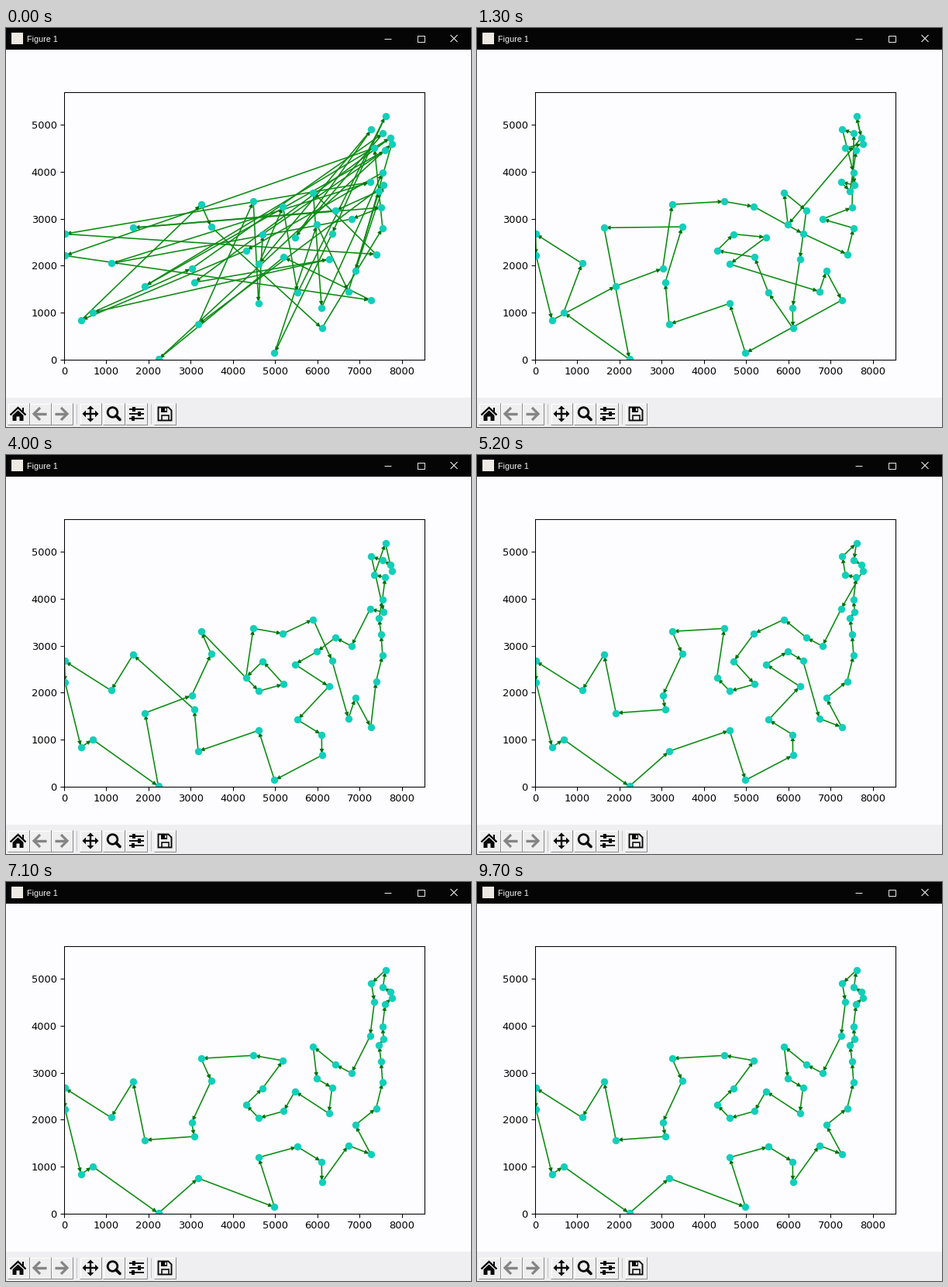
Animation of 600x516 px, one loop 9800 ms. Source, as a matplotlib script:

```python
import itertools

import matplotlib.pyplot as plt
import numpy as np
from matplotlib.animation import FuncAnimation
from matplotlib.collections import LineCollection, PolyCollection
from matplotlib.patches import Circle, Polygon, Rectangle

W, H, DPI = 600, 516, 100
FRAMES, STEP_MS = 98, 100
PX = 72 / DPI  # one pixel in points

LEFT, BOTTOM, PLOT_W, PLOT_H = 75, 429, 465, 346.5
EDGE, HEAD, DOT, INK, GRAY = "#0a8c12", "#00700a", "#12cfb9", "#0a0a0a", "#858585"

# The att48 cities
X = [6734, 2233, 5530, 401, 3082, 7608, 7573, 7265, 6898, 1112, 5468, 5989,
     4706, 4612, 6347, 6107, 7611, 7462, 7732, 5900, 4483, 6101, 5199, 1633,
     4307, 675, 7555, 7541, 3177, 7352, 7545, 3245, 6426, 4608, 23, 7248,
     7762, 7392, 3484, 6271, 4985, 1916, 7280, 7509, 10, 6807, 5185, 3023]
Y = [1453, 10, 1424, 841, 1644, 4458, 3716, 1268, 1885, 2049, 2606, 2873,
     2674, 2035, 2683, 669, 5184, 3590, 4723, 3561, 3369, 1110, 2182, 2809,
     2322, 1006, 4819, 3981, 756, 4506, 2801, 3305, 3173, 1198, 2216, 3779,
     4595, 2244, 2829, 2135, 140, 1569, 4899, 3239, 2676, 2993, 3258, 1942]
X_MAX, Y_MAX = 1.1 * max(X), 1.1 * max(Y)
CITIES = np.column_stack([LEFT + np.array(X) * PLOT_W / X_MAX,
                          BOTTOM - np.array(Y) * PLOT_H / Y_MAX])
DIST = np.hypot(*(CITIES[:, None] - CITIES[None]).transpose(2, 0, 1)).tolist()
N = len(X)

# Tours by city number, starting at 1
SHUFFLED = [30, 35, 8, 23, 2, 37, 9, 7, 29, 21, 34, 13, 6, 42, 19, 5,
            40, 26, 48, 27, 11, 43, 14, 47, 3, 17, 15, 41, 12, 1, 18, 33,
            24, 44, 46, 10, 36, 45, 38, 20, 22, 28, 25, 4, 32, 39, 16, 31]
ROUGH = [45, 35, 4, 42, 48, 32, 21, 47, 15, 38, 31, 46, 44, 27, 43, 28,
         7, 36, 18, 6, 30, 37, 17, 19, 12, 20, 33, 40, 22, 16, 3, 23,
         25, 13, 11, 14, 1, 9, 8, 41, 34, 29, 5, 39, 24, 2, 26, 10]
BETTER = [45, 35, 4, 2, 42, 48, 32, 21, 47, 13, 14, 25, 11, 23, 15, 38,
          31, 46, 44, 18, 28, 27, 6, 30, 43, 17, 19, 37, 7, 36, 12, 20,
          33, 40, 3, 22, 16, 1, 9, 8, 41, 34, 29, 5, 39, 24, 10, 26]
GOOD = [45, 35, 4, 26, 2, 42, 48, 39, 32, 14, 23, 13, 25, 21, 47, 20,
        15, 1, 9, 8, 38, 31, 44, 18, 28, 6, 30, 17, 37, 19, 27, 43,
        7, 36, 46, 33, 12, 11, 40, 3, 22, 16, 41, 34, 29, 5, 24, 10]
BEST = [45, 35, 4, 26, 2, 29, 41, 34, 3, 22, 16, 1, 8, 9, 38, 31,
        44, 18, 7, 28, 6, 37, 19, 27, 17, 43, 30, 36, 46, 33, 20, 12,
        15, 40, 11, 23, 14, 25, 13, 47, 21, 32, 39, 48, 5, 42, 24, 10]


def move_run(tour, first, last, after):
    """Move the run first..last to just behind another city."""
    i, j = tour.index(first), tour.index(last) + 1
    rest = tour[:i] + tour[j:]
    k = rest.index(after) + 1
    return rest[:k] + tour[i:j] + rest[k:]


NEARLY = move_run(BEST, 37, 43, 25)


def arcs(tour):
    return set(zip(tour, tour[1:] + tour[:1]))


def start_at(tour, city):
    i = tour.index(city)
    return tour[i:] + tour[:i]


def best_reversal(tour, wanted):
    """Reversal that gains most wanted edges, the shorter tour on ties."""
    best = (0, 0, 0, 0)
    for i, j in itertools.combinations(range(1, N), 2):
        a, b, c, d = tour[i - 1], tour[i], tour[j], tour[(j + 1) % N]
        gain = (((a, c) in wanted) + ((b, d) in wanted)
                - ((a, b) in wanted) - ((c, d) in wanted))
        if gain > 0:
            extra = DIST[a][c] + DIST[b][d] - DIST[a][b] - DIST[c][d]
            best = min(best, (-gain, extra, i, j))
    return best


def reversals(tour, goal):
    """Tours met on the way from one tour to another by reversals."""
    goal_arcs = arcs(goal)
    wanted = goal_arcs | {(b, a) for a, b in goal_arcs}
    path = [tour]
    while not arcs(tour) <= wanted:
        tour = start_at(tour, goal[0])
        if tour[1] == goal[-1] or tour[-1] == goal[1]:
            tour = tour[:1] + tour[:0:-1]
        gain, _, i, j = best_reversal(tour, wanted)
        if gain == 0:
            i = next(k for k in range(N) if tour[k] != goal[k])
            j = tour.index(goal[i])
        tour = tour[:i] + tour[i:j + 1][::-1] + tour[j + 1:]
        path.append(max(tour, tour[::-1],
                        key=lambda t: len(arcs(t) & goal_arcs)))
    path[-1] = goal
    return path


def plan():
    """One tour for each frame."""
    stages = [(0, SHUFFLED), (13, ROUGH), (24, BETTER), (40, GOOD), (62, NEARLY)]
    stages = [(k, [city - 1 for city in tour]) for k, tour in stages]
    tours = []
    for (k0, a), (k1, b) in zip(stages, stages[1:]):
        path = reversals(a, b)
        for k in range(k1 - k0):
            tours.append(path[round((len(path) - 1) * k / (k1 - k0))])
    tours += [stages[-1][1]] * (70 - len(tours))
    tours += [[city - 1 for city in BEST]] * (FRAMES - len(tours))
    return tours


fig = plt.figure(figsize=(W / DPI, H / DPI), dpi=DPI, facecolor="#fdfcfe")
stage = fig.add_axes([0, 0, 1, 1])
stage.set_xlim(0, W)
stage.set_ylim(H, 0)
stage.axis("off")


def box(x0, y0, x1, y1, **style):
    style.setdefault("lw", 0)
    return stage.add_patch(Rectangle((x0, y0), x1 - x0, y1 - y0, **style))


def stroke(points, width, color=INK, cap="butt"):
    xs, ys = zip(*points)
    stage.plot(xs, ys, color=color, lw=width * PX,
               solid_capstyle=cap, solid_joinstyle="miter")


def shape(points, color=INK):
    stage.add_patch(Polygon(points, fc=color, lw=0))


def title_bar():
    box(0, 0, W, 28, fc="#060506")
    box(7, 6, 22, 21, fc="#efe9e4")
    stage.text(27, 18, "Figure 1", color="#f2f2f2", fontsize=10.8 * PX,
               family="Liberation Sans", va="baseline")
    light = "#e6e6e6"
    stroke([(488, 13.5), (497, 13.5)], 1, light)
    box(530.5, 9.5, 539.5, 17.5, fc="none", ec=light, lw=PX)
    stroke([(573.5, 9), (582.5, 18)], 1.1, light)
    stroke([(573.5, 18), (582.5, 9)], 1.1, light)


def button(x):
    box(x, 485, x + 27, 512, fc="#f0eff0")
    stroke([(x + .5, 512), (x + .5, 485.5), (x + 27, 485.5)], 1, "#ffffff")
    stroke([(x, 512.5), (x + 27.5, 512.5), (x + 27.5, 485)], 1, "#8c8c8c")


def side_arrow(x, way):
    stroke([(x - 8 * way, 499), (x + 7 * way, 499)], 3.4, GRAY)
    stroke([(x, 491), (x + 8 * way, 499), (x, 507)], 3.2, GRAY)


def toolbar():
    box(0, 478, W, H, fc="#efeef0")
    for x in (2, 30, 58, 95, 125, 154, 191):
        button(x)
    for x in (90.5, 186.5):
        stroke([(x, 486), (x, 512)], 1, "#c4c4c4")

    # home
    stroke([(5.5, 500.5), (15.5, 491), (25.5, 500.5)], 2.3)
    box(20.5, 491, 23, 497, fc=INK)
    shape([(8.5, 501), (15.5, 494.5), (22.5, 501), (22.5, 508), (17.5, 508),
           (17.5, 502.5), (13.5, 502.5), (13.5, 508), (8.5, 508)])

    side_arrow(44, -1)
    side_arrow(71, 1)

    # pan
    stroke([(101, 499), (117, 499)], 2.4)
    stroke([(109, 491), (109, 507)], 2.4)
    for dx, dy in ((1, 0), (-1, 0), (0, 1), (0, -1)):
        shape([(109 + 10.5 * dx, 499 + 10.5 * dy),
               (109 + 6 * dx + 4.5 * dy, 499 + 6 * dy + 4.5 * dx),
               (109 + 6 * dx - 4.5 * dy, 499 + 6 * dy - 4.5 * dx)])

    # zoom
    stage.add_patch(Circle((137.5, 497), 6.3, fc="none", ec=INK, lw=2.8 * PX))
    stroke([(142, 501.5), (147, 506.5)], 3.8, cap="round")

    # sliders
    for y, knob in ((493, 165), (499, 172), (505, 164)):
        stroke([(159, y), (178, y)], 1.9)
        box(knob - 2, y - 2.8, knob + 2, y + 2.8, fc=INK)

    # save
    stroke([(196.5, 490.5), (209.5, 490.5), (213.5, 494.5), (213.5, 507.5),
            (196.5, 507.5), (196.5, 489.7)], 1.9)
    box(199.5, 490.5, 208, 496.5, fc=INK)
    box(204.5, 491.5, 206.5, 495, fc="#efeef0")
    stroke([(200.5, 507), (200.5, 501), (209.5, 501), (209.5, 507)], 1.6)


def chart_frame():
    ax = fig.add_axes([LEFT / W, 1 - BOTTOM / H, PLOT_W / W, PLOT_H / H],
                      facecolor="none", zorder=2)
    ax.set_xlim(0, X_MAX)
    ax.set_ylim(0, Y_MAX)
    ax.set_xticks(range(0, 8001, 1000))
    ax.set_yticks(range(0, 5001, 1000))
    ax.tick_params(labelsize=9.375, length=3.3, width=.75, pad=3.3)
    for spine in ax.spines.values():
        spine.set_linewidth(.75)


title_bar()
toolbar()
chart_frame()

clip = box(LEFT, BOTTOM - PLOT_H, LEFT + PLOT_W, BOTTOM, fc="none")
lines = stage.add_collection(LineCollection([], colors=EDGE, linewidths=1.6 * PX))
heads = stage.add_collection(PolyCollection([], facecolors=HEAD, linewidths=0))
dots = stage.scatter(*CITIES.T, s=(9.4 * PX) ** 2, color=DOT, linewidths=0)
for layer, artist in enumerate((lines, heads, dots), 3):
    artist.set_zorder(layer)
    artist.set_clip_path(clip)

TOURS = plan()


def draw(k):
    a = CITIES[TOURS[k]]
    b = np.roll(a, -1, axis=0)
    along = (b - a) / np.linalg.norm(b - a, axis=1, keepdims=True)
    across = along[:, ::-1] * (-1, 1)
    base = b - 8.5 * along
    lines.set_segments(np.stack([a, b], axis=1))
    heads.set_verts(np.stack([b - 2 * along, base + 2.8 * across,
                              base - 2.8 * across], axis=1))
    return lines, heads


anim = FuncAnimation(fig, draw, frames=FRAMES, interval=STEP_MS,
                     repeat=True, repeat_delay=0)
plt.show()
```
